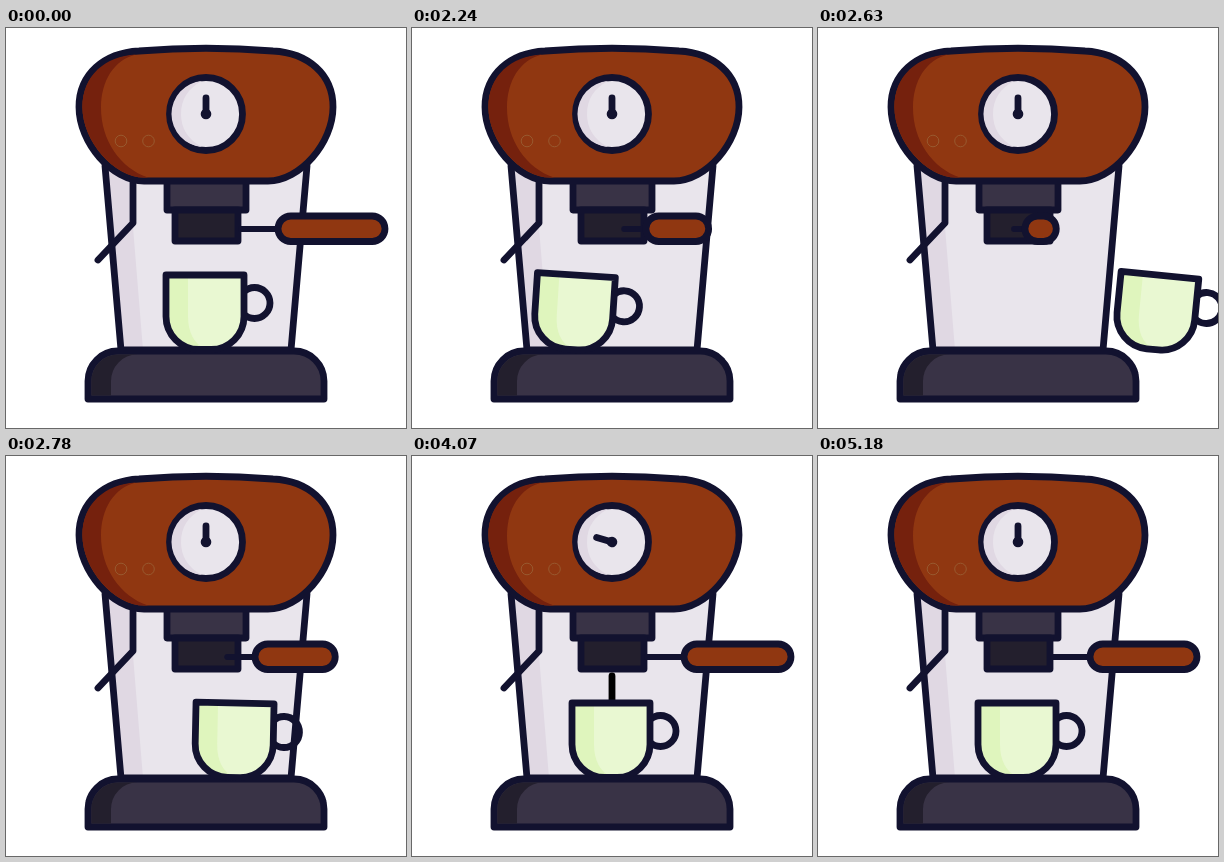
An HTML page that plays this animation: 400 px wide and 400 px high, repeating every 5.21 s.

```html
<!DOCTYPE html>
<html lang="en">
<head>
<meta charset="utf-8">
<title>Coffee machine</title>
<style>
  html, body { margin: 0; width: 100%; height: 100%; overflow: hidden; background: #fff; }
  svg { display: block; width: 100%; height: 100%; }
  .line { fill: none; stroke: #12122f; stroke-width: 6.8; stroke-linecap: round; stroke-linejoin: round; }
  .steel { fill: #e9e5ec; }
  .steel-dim { fill: #e0d8e3; }
  .wood { fill: #903711; }
  .wood-dim { fill: #75210d; }
  .dark { fill: #393346; }
  .dark-dim { fill: #231f2d; }
  .mint { fill: #e9f8d2; }
  .mint-dim { fill: #dff5bd; }
  .lamp { fill: none; stroke: #98592f; stroke-width: 1; }
  #stream { stroke: #000; }
  #stem { stroke-width: 6; }
</style>
</head>
<body>
<svg viewBox="0 0 400 400">
  <!-- body -->
  <path class="steel" d="M99 138L115 322H285L301 138Z"/>
  <path class="steel-dim" d="M99 138L115 322H137L122 138Z"/>
  <path class="line" d="M99 138L115 322H285L301 138Z"/>
  <path class="line" d="M127 150V195L92 232"/>

  <!-- brew head -->
  <path class="line dark" d="M161 150H240V182H161Z"/>
  <path class="line dark-dim" d="M169 182H232V213H169Z"/>

  <!-- top -->
  <path class="line wood" d="M138 153C106 153 73 115 73 79C73 46 98 25 133 23Q200 17.5 267 23C302 25 327 46 327 79C327 115 294 153 262 153Z"/>
  <path class="wood-dim" d="M142 149.600H138C108 149.600 76.400 113 76.400 79C76.400 48 99 28 130 26.600C108 32 95 53 95 80C95 112 114 140 142 149.600Z"/>
  <circle class="lamp" cx="115" cy="113" r="5.800"/>
  <circle class="lamp" cx="142.500" cy="113" r="5.800"/>

  <!-- gauge -->
  <circle class="line steel" cx="200" cy="86" r="36.500"/>
  <path class="steel-dim" d="M196 53A33.100 33.100 0 0 0 196 119Q175 108 175 86Q175 64 196 53Z"/>
  <g id="needle">
    <path class="line" d="M200 70V86"/>
    <circle cx="200" cy="86" r="5.300" fill="#12122f"/>
  </g>

  <path id="stream" class="line"/>

  <!-- base -->
  <path class="line dark" d="M82 371V353A30 30 0 0 1 112 323H288A30 30 0 0 1 318 353V371Z"/>
  <path class="dark-dim" d="M85.400 367.600V353A26.600 26.600 0 0 1 112 326.400H131A26.600 26.600 0 0 0 105 353V367.600Z"/>

  <path id="stem" class="line"/>
  <rect id="grip" class="line wood" y="188" height="25.500" rx="12.750"/>

  <g id="cup">
    <circle class="line" cx="248.500" cy="275" r="15.500"/>
    <path class="mint" d="M160 247H238V288.500A33 33 0 0 1 205 321.500H193A33 33 0 0 1 160 288.500Z"/>
    <path class="mint-dim" d="M160 247H182V288Q182 313 200 321.500H193A33 33 0 0 1 160 288.500Z"/>
    <path class="line" d="M160 247H238V288.500A33 33 0 0 1 205 321.500H193A33 33 0 0 1 160 288.500Z"/>
  </g>
</svg>
<script>
const LOOP = 5210, STEP = 30, OFFSET = 20;
const el = id => document.getElementById(id);
const [needle, stream, stem, grip, cup] = ['needle', 'stream', 'stem', 'grip', 'cup'].map(el);

const progress = (t, start, length) => Math.min(1, Math.max(0, (t - start) / length));
const expoOut = p => p >= 1 ? 1 : 1 - 2 ** (-10 * p);

// The lever swings towards the viewer and back, seen as a change of width.
function drawLever(t) {
  const s = t < 2580 ? 1 - progress(t, 2000, 580) : expoOut(progress(t, 2580, 1000));
  const x = v => 180 + (v - 180) * s;
  stem.setAttribute('d', `M${x(235)} 201H${x(272)}`);
  grip.setAttribute('x', x(272));
  grip.setAttribute('width', Math.max(0.01, x(379) - x(272)));
}

// The cup leaves to the left and a fresh one arrives from the right.
function drawCup(t) {
  const out = progress(t, 2000, 500) ** 3;
  const rest = (1 - progress(t, 2500, 500)) ** 3;
  const [dx, tilt] = t < 2500 ? [-356 * out, 34 * out] : [335 * rest, 14 * rest];
  cup.setAttribute('transform', `translate(${dx} 0) rotate(${tilt} 200 320)`);
}

function drawNeedle(t) {
  const turn = expoOut(progress(t, 3000, 1000)) - expoOut(progress(t, 4000, 1000));
  needle.setAttribute('transform', `rotate(${-120 * turn} 200 86)`);
}

function drawStream(t) {
  const top = 213 + 37 * progress(t, 4000, 370);
  const bottom = 213 + 37 * progress(t, 3000, 150);
  const on = t > 3000 && t < 4370;
  stream.setAttribute('d', on ? `M200 ${top}V${bottom}` : '');
}

function draw(now) {
  const t = OFFSET + STEP * Math.floor((now % LOOP - OFFSET) / STEP);
  drawLever(t);
  drawCup(t);
  drawNeedle(t);
  drawStream(t);
}

let begin;
function tick(now) {
  begin ??= now;
  draw(now - begin);
  requestAnimationFrame(tick);
}
draw(0);
requestAnimationFrame(tick);
</script>
</body>
</html>
```
